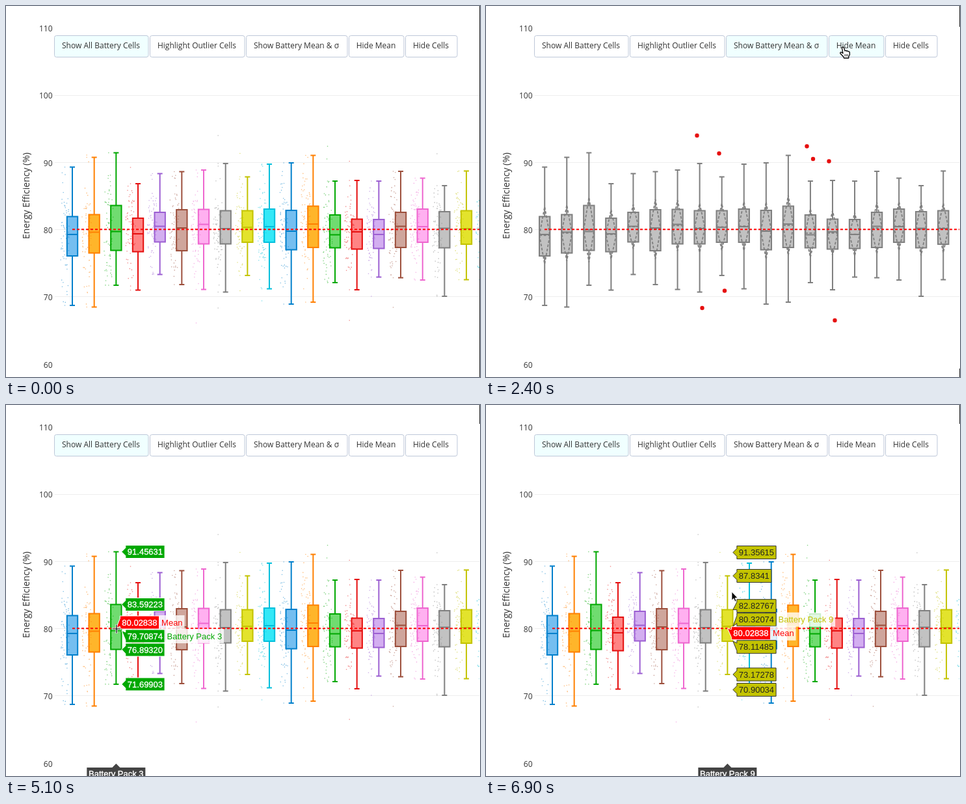
An HTML page for the animation above (7.1 s loop, 729 by 570 pixels).

```html
<!DOCTYPE html>
<html lang="en">
<head>
<meta charset="utf-8">
<title>Battery energy efficiency</title>
<style>
  html, body { margin: 0; width: 100%; height: 100%; overflow: hidden; background: #fff; }
  svg { display: block; width: 729px; height: 570px; }
  text { font: 12px "Open Sans", sans-serif; fill: #333; }
  .button rect { fill: #fff; stroke: #bec8d9; }
  .button.lit rect { fill: #f0ffff; }
  .button text { text-anchor: middle; }
  .tick { text-anchor: end; }
  .title { font-size: 14px; text-anchor: middle; }
  .grid { stroke: #eee; }
  .boxes path { stroke-width: 2; }
  .dots path { fill: none; stroke-width: 1.6; stroke-linecap: round; opacity: .5; }
  .mean { stroke: #f00; stroke-width: 2; stroke-dasharray: 4 3; }
  .sd { fill: none; stroke: #7f7f7f; stroke-width: 1.8; stroke-dasharray: 4 2.5; }
  .outliers { fill: #e60f0f; }
  .hover text { font: 13px "Liberation Sans", Arial, sans-serif; }
  .axis { text-anchor: middle; }
  #edge { stroke: #333; }
</style>
</head>
<body>
<svg viewBox="0 0 729 570">
  <defs>
    <clipPath id="plot"><rect x="74" y="0" width="654" height="570"/></clipPath>
    <g id="hand">
      <path d="M-1.6 1Q0-.8 1.5 1L3 6Q4.6 4.8 5.6 6.3Q7.4 5.4 8.2 7Q9.8 6.4 10.3 8.2L10.4 12L8.8 14.5V17H1.5L.8 15L-4.2 9.8Q-4.4 7.8-2.5 8L0 9.8Z"
        fill="#fff" stroke="#000" stroke-width="1.3" stroke-linejoin="round"/>
      <path d="M3 11v3.5M5.2 11v3.5M7.3 11v3.5" stroke="#000" stroke-width=".8"/>
    </g>
    <g id="cross" fill="none">
      <path d="M-7 0H7M0-7V7" stroke="#fff" stroke-width="3"/>
      <path d="M-6.5 0H6.5M0-6.5V6.5" stroke="#000" stroke-width="1.2"/>
    </g>
    <path id="arrow" d="M0 0V13L3 10.3L5 15L7 14L5 9.6H9Z" fill="#000" stroke="#fff" stroke-width=".8"/>
  </defs>
  <g id="chart"></g>
  <g id="buttons"></g>
  <path id="edge"/>
  <g id="hover" class="hover"></g>
  <use id="cursor"/>
</svg>
<script>
const $ = id => document.getElementById(id);
const LOOP = 7100, STEP = 300, MEAN_Y = 343.2;

// line, box fill, label text
const PALETTE = [
  ['#0080cc', '#74bef0', '#fff'], ['#ff8000', '#ffb52a', '#222'],
  ['#00a800', '#70dc70', '#fff'], ['#e50f0f', '#ff8484', '#fff'],
  ['#9c5fd2', '#d3aef0', '#fff'], ['#9c4f3c', '#cfa69c', '#fff'],
  ['#ee66cf', '#ffb0f0', '#222'], ['#7f7f7f', '#c2c2c2', '#fff'],
  ['#c3c300', '#e3e32c', '#222'], ['#00bfdc', '#33e8f7', '#222']
];
const GREY = ['#7f7f7f', '#c1c1c1'];

// lower fence, q1, median, q3, upper fence
const PACKS = [
  [460, 384, 351, 323.5, 247.5], [462.5, 379.5, 347.5, 320.5, 232.5],
  [429, 375.5, 346.5, 306.5, 225.5], [436.5, 377.5, 350, 326, 273],
  [412.5, 362.5, 338.5, 317, 257.5], [428, 376, 341, 313, 254.5],
  [435.5, 365.5, 335.5, 312.5, 252], [439.5, 365.5, 342, 314.5, 242],
  [414, 363, 340, 314.5, 262.5], [434.5, 363, 339, 312, 243],
  [458, 374.5, 346, 314, 241], [455, 371, 335, 307.5, 229.5],
  [425, 371.5, 351.5, 321, 269], [436, 373.5, 347, 327.5, 268],
  [416.5, 372.5, 351, 328, 269], [417.5, 371, 338.5, 317, 254],
  [421, 363, 339, 312, 264.5], [446, 371.5, 341.5, 316, 276],
  [420.5, 366, 342, 314.5, 253.5], [430, 366, 342, 315, 250]
];
const LOWEST = { 6: 487, 7: 464, 8: 437.5, 9: 453, 13: 483, 14: 446, 15: 463 };
const HIGHEST = { 1: 229, 3: 248, 7: 199, 8: 226.5, 12: 215.5, 13: 238.5, 17: 227 };
const OUTLIERS = [[324.5, 199], [358.5, 226.5], [332.5, 464], [367, 437.5],
  [493.5, 215.5], [503, 235], [527.5, 238.5], [536.5, 483]];
const READINGS = {
  0: ['89.29192', '81.92104', '79.29452', '76.06094', '68.7305'],
  5: ['88.61739', '82.95205', '80.28709', '76.85464', '71.80059'],
  8: ['91.35615', '87.8341', '82.82767', '80.32074', '78.11485', '73.17278', '70.90034']
};
const BUTTONS = [
  ['Show All Battery Cells', 74, 219], ['Highlight Outlier Cells', 221, 367],
  ['Show Battery Mean &amp; σ', 369, 525], ['Hide Mean', 527, 612], ['Hide Cells', 614, 694]
];

// view, active button, cursor, x, y, hovered pack
const TIMELINE = [
  ['all', 0], ['all', 0, 'hand', 250, 60], ['out', 1, 'hand', 277, 62],
  ['cells', 4, 'hand', 632, 60], ['cells', 4, 'hand', 632, 60], ['cells', 4, 'hand', 632, 60],
  ['out', 1, 'hand', 277, 63], ['out', 1, 'hand', 440, 63],
  ['sd', 2, 'hand', 549, 63], ['sd', 2, 'hand', 549, 63],
  ['out', 3, 'hand', 549, 63], ['out', 3, 'hand', 400, 63], ['out', 1, 'hand', 275, 63],
  ['all', 0, 'hand', 150, 63], ['all', 0, 'cross', 120, 200],
  ['all', 0, 'cross', 104, 345, 0], ['all', 0, 'cross', 136, 345, 1],
  ['all', 0, 'cross', 170, 344, 2], ['all', 0, 'cross', 232, 343, 4],
  ['all', 0, 'cross', 264, 342, 5], ['all', 0, 'cross', 300, 337, 6],
  ['all', 0, 'cross', 334, 325, 7], ['all', 0, 'cross', 345, 312, 7],
  ['all', 0, 'arrow', 378, 287, 8]
];
// step, then the span of the right edge line that is cleared
const EDGE_GAPS = [[14, 29, 570], [12, 31, 557], [8, 32, 557], [3, 43, 489], [2, 44, 485], [0, 0, 0]];

const cellX = i => 102 + 33.67 * i;
const greyX = i => 90.2 + 34.06 * i;
const color = i => PALETTE[i % 10];
const reading = y => (100 - (y - 137.5) / 10.3).toFixed(5);

let seed = 7;
const random = () => (seed = (seed * 16807) % 2147483647) / 2147483647;
const bell = () => Math.sqrt(-2 * Math.log(random())) * Math.cos(2 * Math.PI * random());

function boxPlot(x, [lo, q1, mid, q3, hi], [line, fill]) {
  return `<path stroke="${line}" fill="${fill}" d="M${x} ${q1}V${lo}M${x - 4} ${lo}h8M${x} ${q3}V${hi}M${x - 4} ${hi}h8
    M${x - 8.2} ${q3}h16.4V${q1}h-16.4ZM${x - 8.2} ${mid}h16.4"/>`;
}

function cellDots(i) {
  const [lo, q1, mid, q3, hi] = PACKS[i], x = cellX(i) - 11.5;
  let d = '';
  for (let n = 0; n < 72; n++) {
    const z = bell(), y = mid + z * (q1 - q3) * .76;
    const spread = 7.5 * Math.exp(-z * z / 7);
    if (y < lo && y > hi) d += `M${(x + (random() * 2 - 1) * spread).toFixed(1)} ${y.toFixed(1)}h.01`;
  }
  for (const y of [lo, hi, LOWEST[i], HIGHEST[i]]) if (y) d += `M${x} ${y}h.01`;
  if (i === 12) d += `M${x - 1} 235h.01`;
  return `<path stroke="${color(i)[0]}" d="${d}"/>`;
}

function deviation(i) {
  const [, q1, mid, q3] = PACKS[i], x = greyX(i);
  const mean = (mid + (q1 + q3) / 2) / 2, sd = (q1 - q3) * .68 + 3;
  return `<path d="M${x - 8} ${mean}L${x} ${mean - sd}L${x + 8} ${mean}L${x} ${mean + sd}ZH${x + 8}"/>`;
}

const each = draw => PACKS.map((_, i) => draw(i)).join('');
const meanLine = x => `<path class="mean" d="M${x} ${MEAN_Y}H728"/>`;
const fullRange = i => [LOWEST[i] || PACKS[i][0], ...PACKS[i].slice(1, 4), HIGHEST[i] || PACKS[i][4]];

function buildChart() {
  const ticks = [110, 100, 90, 80, 70, 60].map((v, k) =>
    `<text class="tick" x="71.5" y="${39 + 103.3 * k}">${v}</text>`).join('');
  $('chart').innerHTML = `${ticks}
    <text class="title" transform="translate(36 291.5) rotate(-90)">Energy Efficiency (%)</text>
    <path class="grid" d="M75 137.5H728M75 240.5H728M75 343.5H728M75 446.5H728"/>
    <g clip-path="url(#plot)">
      <g id="all"><g class="boxes">${each(i => boxPlot(cellX(i), PACKS[i], color(i)))}</g>
        <g class="dots">${each(cellDots)}</g>${meanLine(102)}</g>
      <g id="cells"><g class="boxes">${each(i => boxPlot(greyX(i), fullRange(i), GREY))}</g>${meanLine(90)}</g>
      <g id="out"><g class="boxes">${each(i => boxPlot(greyX(i), PACKS[i], GREY))}</g>
        <g id="sd" class="sd">${each(deviation)}</g>
        <g class="outliers">${OUTLIERS.map(([x, y]) => `<circle cx="${x}" cy="${y}" r="3.2"/>`).join('')}</g>
        ${meanLine(90)}</g>
    </g>`;
  $('buttons').innerHTML = BUTTONS.map(([label, left, right]) =>
    `<g class="button"><rect x="${left + .5}" y="45.5" width="${right - left - .5}" height="33" rx="3"/>
     <text x="${(left + right) / 2 - .5}" y="65">${label}</text></g>`).join('');
}

// Push labels apart: overlapping neighbours merge into a stack around their average.
function spreadLabels(labels) {
  const gap = 21, stacks = [];
  for (const label of labels) {
    let stack = { items: [label], mid: label.y };
    for (let prev; (prev = stacks.at(-1)) &&
         stack.mid - prev.mid < gap * (stack.items.length + prev.items.length) / 2; stacks.pop()) {
      const items = [...prev.items, ...stack.items];
      stack = { items, mid: items.reduce((sum, l) => sum + l.y, 0) / items.length };
    }
    stacks.push(stack);
  }
  for (const { items, mid } of stacks)
    items.forEach((l, k) => l.at = mid + gap * (k - (items.length - 1) / 2));
}

function tag({ x, y, at, text, fill, ink, name }) {
  const width = text.length * 7.23 + 2.4, right = x + 6 + width;
  const nameWidth = name === 'Mean' ? 39 : 91;
  const border = ink === '#fff' ? '#fff' : '#333';
  const side = name ? `<rect x="${right}" y="${at - 11}" width="${nameWidth}" height="22" fill="#fff" opacity=".8"/>
    <text x="${right + 3.5}" y="${at + 4.7}" style="fill:${fill}">${name}</text>` : '';
  return `${side}<path fill="${fill}" stroke="${border}" d="M${x} ${y}L${x + 6} ${at - 6}V${at - 10}h${width}v20h${-width}V${at + 6}Z"/>
    <text x="${x + 9}" y="${at + 4.7}" style="fill:${ink};stroke:${ink};stroke-width:${ink === '#fff' ? .35 : 0}">${text}</text>`;
}

function hoverLabels(i) {
  if (i === undefined) return '';
  const x = cellX(i), [fill, , ink] = color(i), title = `Battery Pack ${i + 1}`;
  const levels = [...PACKS[i], LOWEST[i], HIGHEST[i]].filter(Boolean).sort((a, b) => a - b);
  const labels = levels.map((y, k) => ({
    x: x + 8.5, y, fill, ink,
    text: READINGS[i] ? READINGS[i][k] : reading(y),
    name: y === PACKS[i][2] ? title : ''
  }));
  labels.push({ x, y: MEAN_Y, fill: '#f00', ink: '#fff', text: '80.02838', name: 'Mean' });
  labels.sort((a, b) => a.y - b.y);
  spreadLabels(labels);
  return labels.map(tag).join('') +
    `<path fill="#444" d="M${x} 551l6 6h39v20h-90v-20h39Z"/>
     <text class="axis" x="${x}" y="571" style="fill:#fff;stroke:#fff;stroke-width:.4">${title}</text>`;
}

function show(step) {
  const [view, active, cursor, x, y, pack] = TIMELINE[step];
  const visible = { all: view === 'all', cells: view === 'cells', out: view === 'out' || view === 'sd', sd: view === 'sd' };
  for (const id in visible) $(id).style.display = visible[id] ? '' : 'none';
  [...$('buttons').children].forEach((button, k) => {
    const hovered = cursor === 'hand' && x > BUTTONS[k][1] && x < BUTTONS[k][2];
    button.classList.toggle('lit', k === active || hovered);
  });
  const [, top, bottom] = EDGE_GAPS.find(([from]) => step >= from);
  $('edge').setAttribute('d', `M728.5 0V${top}M728.5 ${bottom}V570`);
  $('hover').innerHTML = hoverLabels(pack);
  $('cursor').setAttribute('href', cursor ? '#' + cursor : '');
  $('cursor').setAttribute('transform', `translate(${x || 0} ${y || 0})`);
}

let shown = -1;
function tick() {
  const step = Math.floor(performance.now() % LOOP / STEP);
  if (step !== shown) show(shown = step);
  requestAnimationFrame(tick);
}
buildChart();
tick();
</script>
</body>
</html>
```
